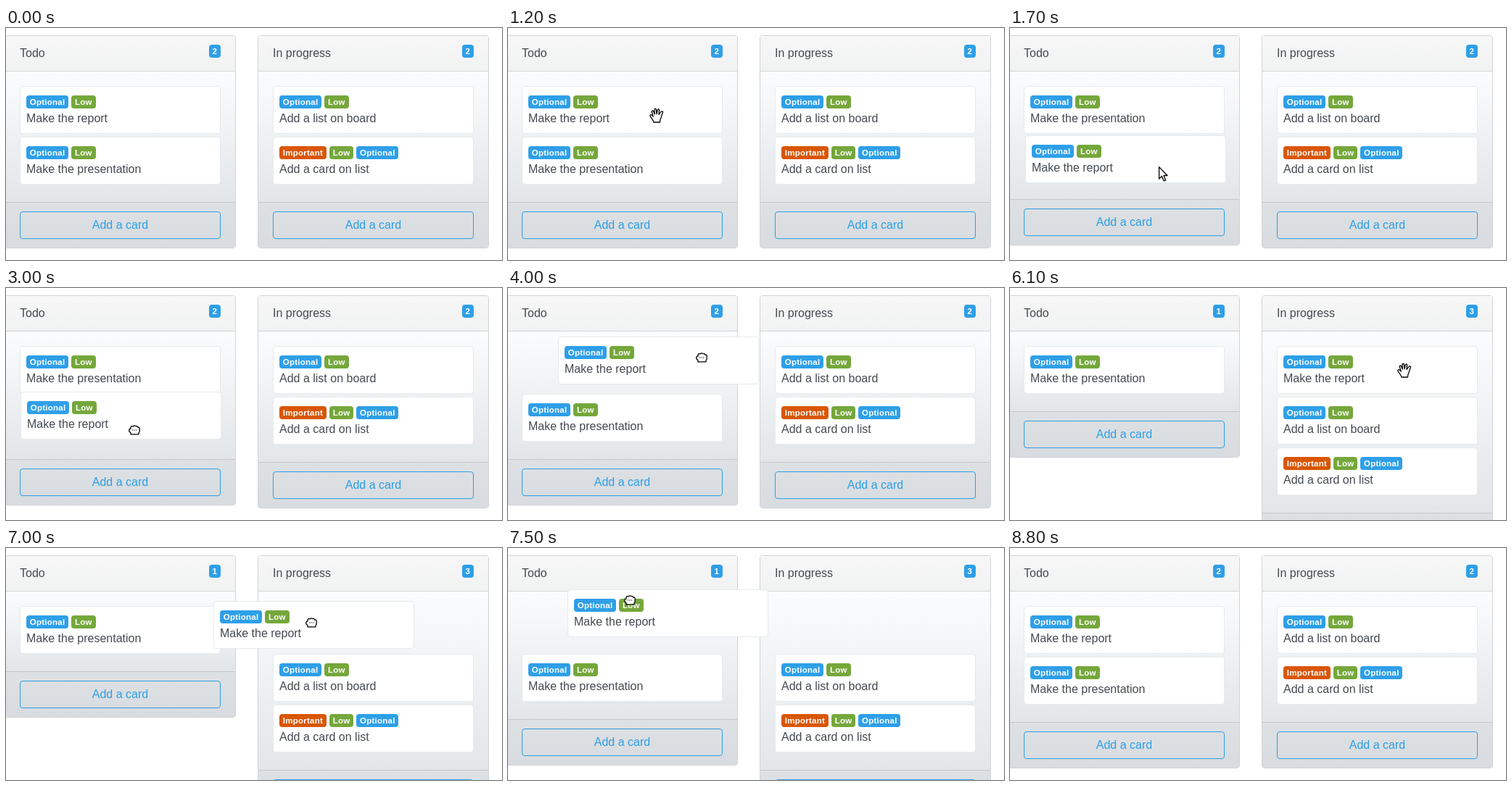
An HTML page that plays this animation: 684 by 320 pixels, repeating every 9.8 s.

```html
<!DOCTYPE html>
<html lang="en">
<head>
<meta charset="utf-8">
<title>Board</title>
<style>
* { box-sizing: border-box; }
html, body { margin: 0; width: 100%; height: 100%; overflow: hidden; background: #fff; }
body { font: 16px/24px "Liberation Sans", Arial, sans-serif; color: #454a50; }
#stage { position: relative; width: 684px; height: 320px; overflow: hidden; }
#stage div, #stage svg { position: absolute; white-space: nowrap; }
.column { top: 10px; width: 319px; border: 1px solid #d0d3d6; border-radius: 4px; overflow: hidden;
  background: linear-gradient(#fbfcfd, #e2e6e9) 0 49px / 100% calc(100% - 112px) no-repeat; }
.column .head { left: 0; top: 0; width: 100%; height: 49px; padding: 12px 20px;
  border-bottom: 1px solid #d0d3d6; background: linear-gradient(#f7f7f7, #f1f2f2); }
.column .foot { left: 0; bottom: 0; width: 100%; height: 63px;
  border-top: 1px solid #c3c7ca; background: linear-gradient(#dee1e4, #d8dbdf); }
.foot .button { left: 20px; top: 12px; width: 277px; height: 38px; line-height: 36px; text-align: center;
  color: #2b9fe6; border: 1px solid #2b9fe6; border-radius: 4px; }
.tag { display: inline-block; padding: 3px 4.8px; font-size: 11.5px; line-height: 12px; font-weight: 700;
  letter-spacing: .25px; color: #fff; background: #2e9fe8; border-radius: 4px; }
.head .tag { position: absolute; right: 20px; top: 12px; }
.low { background: #75a73b; }
.important { background: #d95604; }
.card { width: 277px; height: 66px; background: #fff; border: 1px solid #e6eaed; border-radius: 4px; }
.card .tags { display: flex; gap: 4px; left: 8px; top: 12px; }
.card .title { left: 8px; top: 32px; }
#stage svg { overflow: visible; fill: #fff; stroke: #000; stroke-width: 1.3; stroke-linejoin: round; }
</style>
</head>
<body>
<div id="stage"></div>
<script>
const LOOP = 9800, STEP = 100, SETTLE = 200;
const CARD = 66, SLOT = 70, TOP = 80, LEFT = 19, RIGHT = 368;
const stage = document.getElementById('stage');

function add(html) {
  stage.insertAdjacentHTML('beforeend', html);
  return stage.lastElementChild;
}

function makeColumn(name, x) {
  const el = add(`<div class="column" style="left:${x}px">
    <div class="head">${name}<span class="tag">2</span></div>
    <div class="foot"><div class="button">Add a card</div></div></div>`);
  return { el, count: el.querySelector('.tag') };
}

function makeCard(title, ...tags) {
  const spans = tags.map(t => `<span class="tag ${t.toLowerCase()}">${t}</span>`).join('');
  return add(`<div class="card"><div class="tags">${spans}</div><div class="title">${title}</div></div>`);
}

const makeCursor = (path, dx, dy) =>
  ({ el: add(`<svg width="20" height="21"><path d="${path}"/></svg>`), dx, dy });

const todo = makeColumn('Todo', LEFT - 21);
const progress = makeColumn('In progress', RIGHT - 21);
const presentation = makeCard('Make the presentation', 'Optional', 'Low');
const listCard = makeCard('Add a list on board', 'Optional', 'Low');
const cardCard = makeCard('Add a card on list', 'Important', 'Low', 'Optional');
const report = makeCard('Make the report', 'Optional', 'Low');

const cursors = {
  arrow: makeCursor('M.6.6V17L4.4 13.5 7.1 19.8 9.7 18.7 7 12.5H12Z', 0, 0),
  open: makeCursor('M6 20C5 16 1.5 13.5.8 10.8 1 9 3 9.3 4.2 11L5.2 12.2 3.3 5.5C3 3.5 5 3.2 5.7 5L7.3 9 7 2.8C7 .6 9.2.6 9.4 2.8L10 8.6 11.3 3C11.8 1.2 13.8 1.6 13.6 3.5L13 9.3 16 5.6C17.4 4.2 19.2 5.2 18.4 6.8 16.5 10 17 13 14.8 16.5L14.5 20Z', -10, -10),
  closed: makeCursor('M3 12.8V11L.8 8.5V6.5Q1 5 3 5V3Q4 .8 6 2 8 0 9.7 1.6 12 .8 12.7 3 15.4 2.8 15.2 5.5V9L14 11V12.8ZM5.5 6.5v1M8 6.5v1M10.5 6.5v1', -8, -7)
};

// Pointer strokes: start, duration, end point.
const entry = [122, -2];
const strokes = [
  [300, 900, 205, 120], [1300, 300, 207, 188], [1600, 100, 205, 191], [1700, 300, 175, 209],
  [2800, 800, 182, 156], [3800, 200, 267, 96], [4000, 600, 540, 111], [4600, 100, 570, 86],
  [4700, 700, 544, 113], [6700, 700, 258, 90], [7400, 100, 168, 72], [7500, 500, 195, 115],
  [8000, 600, 77, -6]];

const drags = [
  { start: 1300, drop: 1700, from: [LEFT, TOP], to: [LEFT, TOP + SLOT] },
  { start: 2800, drop: 5300, from: [LEFT, TOP + SLOT], to: [RIGHT, TOP] },
  { start: 6700, drop: 8000, from: [RIGHT, TOP], to: [LEFT, TOP] }];

const ramp = (t, start, span = SETTLE) => Math.min(1, Math.max(0, (t - start) / span));
const mix = (a, b, k) => a.map((v, i) => v + (b[i] - v) * k);
const pointer = t => strokes.reduce((p, [start, span, ...end]) => mix(p, end, ramp(t, start, span)), entry);

// A dragged card trails the pointer by one step, then glides into its slot.
function reportAt(t) {
  const drag = drags.filter(d => d.start <= t).pop();
  if (!drag) return drags[0].from;
  const now = pointer(t - STEP), grab = pointer(drag.start);
  const carried = drag.from.map((v, i) => v + now[i] - grab[i]);
  return mix(carried, drag.to, ramp(t, drag.drop));
}

function place(el, [x, y]) {
  el.style.left = Math.round(x) + 'px';
  el.style.top = Math.round(y) + 'px';
}

function setColumn({ el, count }, cards, space) {
  count.textContent = cards;
  el.style.height = Math.round(space) + 154 + 'px';
}

function render(now) {
  const t = Math.floor(now % LOOP / STEP) * STEP;
  const active = drags.find(d => t >= d.start && t < d.drop + SETTLE);
  const held = active && t < active.drop;
  const size = active ? CARD : SLOT;

  const below = size * (ramp(t, 1400) - ramp(t, 3100));
  const above = size * (1 - ramp(t, 1400) + ramp(t, 3100) - ramp(t, 5400, STEP) + ramp(t, 7100));
  const beside = size * (ramp(t, 4300) - ramp(t, 8100, STEP));
  place(presentation, [LEFT, TOP + above]);
  place(listCard, [RIGHT, TOP + beside]);
  place(cardCard, [RIGHT, TOP + beside + SLOT]);
  place(report, reportAt(t));

  const moved = t >= drags[1].drop + SETTLE && t < drags[2].drop + SETTLE;
  setColumn(todo, moved ? 1 : 2, above + below + SLOT);
  setColumn(progress, moved ? 3 : 2, beside + 2 * SLOT);

  const hover = t >= 1200 && t < drags[2].drop && !active;
  const shape = held ? 'closed' : hover ? 'open' : 'arrow';
  const [x, y] = pointer(t);
  for (const [name, { el, dx, dy }] of Object.entries(cursors)) {
    el.style.display = name === shape && t >= 300 && t < 8800 ? 'block' : 'none';
    place(el, [x + dx, y + dy]);
  }
}

const start = performance.now();
function tick() {
  render(performance.now() - start);
  requestAnimationFrame(tick);
}
tick();
</script>
</body>
</html>
```
